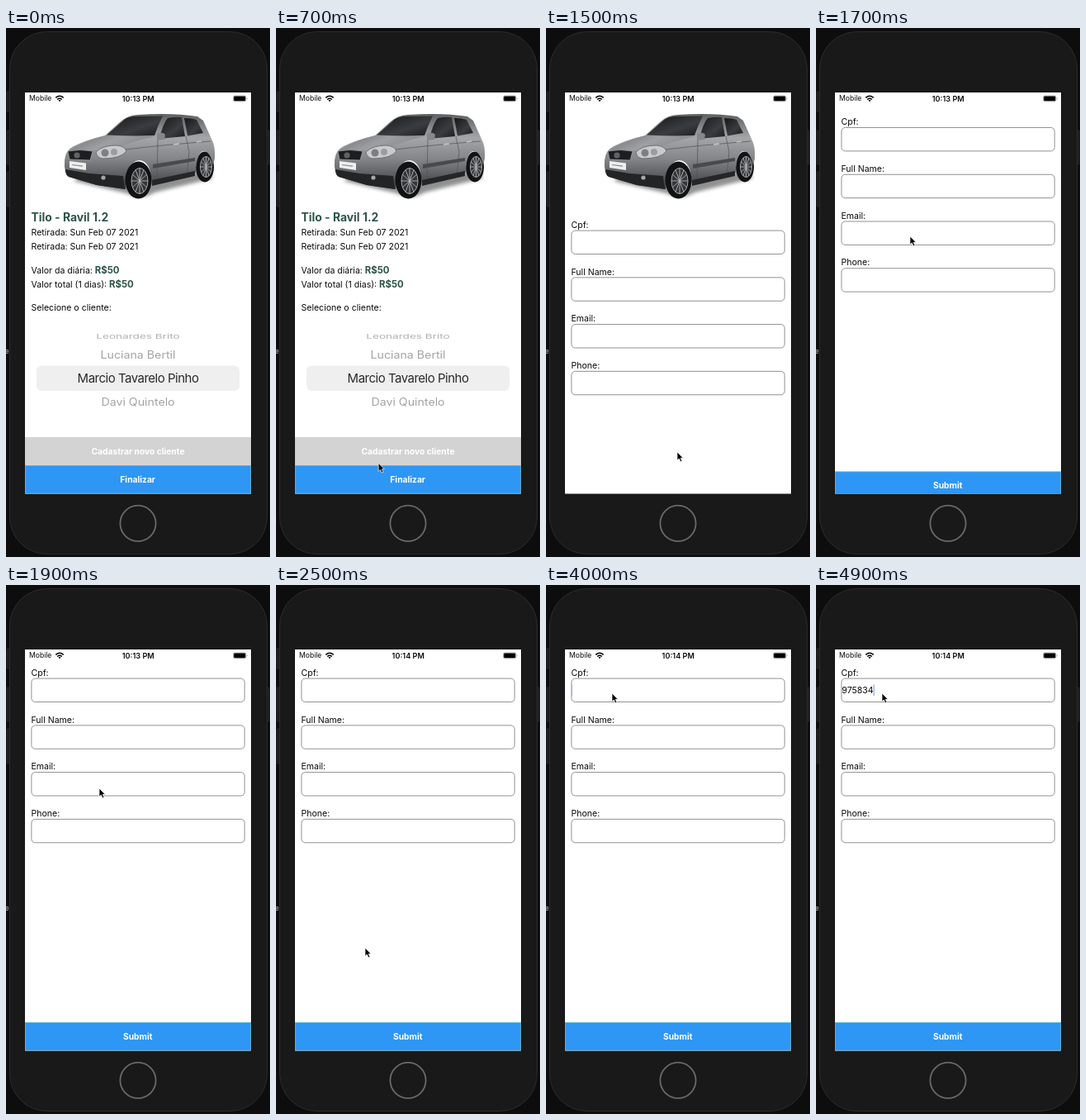
An HTML page that plays this animation: 320x640 px, repeating every 5 s.

```html
<!DOCTYPE html>
<html lang="pt">
<head>
<meta charset="utf-8">
<title>Aluguel</title>
<style>
  html, body { margin: 0; width: 100%; height: 100%; overflow: hidden; background: #0d0d0d; }
  svg { display: block; width: 100%; height: 100%; }
  text { font-family: Inter, Roboto, sans-serif; font-size: 10.55px; fill: #0a0a0a; white-space: pre; }
  .bold { font-weight: 700; }
  .mid { text-anchor: middle; }
  .green { fill: #2e5546; }
  .price { font-size: 11.4px; }
  .action { font-size: 10.25px; fill: #fff; }
  .bar { fill: #2e96f5; stroke: #55b2d6; stroke-width: .9; }
  .row { font-size: 14.2px; fill: #a3a3a3; }
  .status { font-size: 8.6px; }
  .field { fill: #fff; stroke: #858585; stroke-width: .9; }
</style>
</head>
<body>
<svg viewBox="0 0 320 640">
  <defs>
    <clipPath id="screen"><rect x="23" y="78" width="274" height="485.5"/></clipPath>
    <clipPath id="content"><rect x="23" y="92" width="274" height="471.5"/></clipPath>
    <filter id="soft" x="-20%" y="-60%" width="140%" height="220%"><feGaussianBlur stdDeviation="2.2"/></filter>
    <linearGradient id="paint" x1="0" y1="0" x2="0" y2="1">
      <stop offset="0" stop-color="#5d5f61"/><stop offset=".32" stop-color="#a4a6a8"/>
      <stop offset=".6" stop-color="#838588"/><stop offset="1" stop-color="#38393b"/>
    </linearGradient>
    <linearGradient id="hood" x1="0" y1="0" x2="1" y2=".4">
      <stop offset="0" stop-color="#6c6e71"/><stop offset=".55" stop-color="#9d9fa2"/><stop offset="1" stop-color="#85878a"/>
    </linearGradient>
    <linearGradient id="glass" x1="0" y1="0" x2="1" y2="1">
      <stop offset="0" stop-color="#151617"/><stop offset=".6" stop-color="#3a3d40"/><stop offset="1" stop-color="#1a1b1d"/>
    </linearGradient>
  </defs>

  <g id="phone">
    <rect width="320" height="640" fill="#0d0d0d"/>
    <g fill="#1d1d1d" stroke="#303030" stroke-width=".7">
      <rect x="1" y="77" width="6" height="24" rx="1"/>
      <rect x="1" y="124" width="6" height="41" rx="1"/>
      <rect x="1" y="174" width="6" height="42" rx="1"/>
      <rect x="314" y="124" width="5" height="41" rx="1"/>
    </g>
    <rect x="4.5" y="4.5" width="312" height="632" rx="45" fill="#191919" stroke="#2c2c2c"/>
    <circle cx="160" cy="599.3" r="21.6" fill="#191919" stroke="#696969" stroke-width="1.8"/>
    <text x="-1" y="394" style="font-size:8px;fill:#bbb">e</text>
    <rect x="23" y="78" width="274" height="485.5" fill="#fff"/>
  </g>

  <g clip-path="url(#content)">
    <g id="car">
      <path d="M82 185L146 200Q164 209 180 199L250 182L248 174L95 176Z" fill="#222" opacity=".5" filter="url(#soft)"/>
      <ellipse cx="241" cy="168" rx="11" ry="18.5" fill="#111213"/>
      <path d="M71 160Q72 148 82 143Q98 135 120 130L138 114Q147 105.500 160 105Q200 102 232 107L239 112L249 134Q254 143 253 158L251 166Q247 148 239 149Q231 151 230 174L228 179L177 190Q176 160 161 160Q146 162 145 195L110 190L76 180Q70 176 71 160Z" fill="url(#paint)"/>
      <path d="M76 149Q92 137 121 130L181 131Q154 137 141 143L108 148Z" fill="url(#hood)"/>
      <path d="M122 129.500L140 114Q146 107.500 155 107L190 106.500Q184 118 180 130Q153 131 122 129.500Z" fill="url(#glass)"/>
      <path d="M186 134Q190 116 196 109Q206 107 213 108L217 131Z" fill="url(#glass)"/>
      <path d="M216 109Q226 109 231 111L239 127L220 130.500Z" fill="url(#glass)"/>
      <path d="M184 135L183 184M218 131L222 150L219 180M145 147Q185 142 248 137" fill="none" stroke="#505255" stroke-width=".7"/>
      <path d="M178 165L229 157V161L178 170Z" fill="#484a4c"/>
      <path d="M177 184L229 173V179L177 191Z" fill="#252628"/>
      <path d="M183 128Q190 125 193 129L192 135L183 136Z" fill="#85878a"/>
      <path d="M203 141l7-1M231 138l6-1" stroke="#c4c4c4" stroke-width="1.4"/>
      <path d="M75 149Q90 146 105 149L102 160L77 159Z" fill="#1d1e20" stroke="#aaa" stroke-width=".7"/>
      <circle cx="86" cy="154" r="3.600" fill="#606266"/>
      <path d="M109 150Q117 142 134 142Q144 143 146 149Q139 158 117 158Q110 157 109 150Z" fill="#c8cbcd" stroke="#55575a" stroke-width=".7"/>
      <circle cx="120" cy="151" r="4.500" fill="#7b7f83"/>
      <circle cx="131" cy="150" r="4" fill="#999da0"/>
      <path d="M72 171L101 176L142 179L144 195L110 190L76 180Q72 178 72 171Z" fill="#232426"/>
      <path d="M77 161L97 163.500V172L77 169Z" fill="#eee"/>
      <path d="M80 165.500l13 1.600" stroke="#888" stroke-width="1.200"/>
      <circle cx="118" cy="181" r="2.600" fill="#a5a7a9"/>
      <ellipse cx="160.500" cy="184" rx="16" ry="22.500" fill="#111213"/>
      <g id="wheels" stroke="#b4b6b8" fill="#333537" stroke-width=".9"></g>
    </g>
  </g>

  <g id="rental" clip-path="url(#screen)">
    <text class="bold green" x="30.5" y="234" style="font-size:13.9px">Tilo - Ravil 1.2</text>
    <text x="30.5" y="251">Retirada: Sun Feb 07 2021</text>
    <text x="30.5" y="268.200">Retirada: Sun Feb 07 2021</text>
    <text x="30.5" y="296.700">Valor da diária: <tspan class="bold green price">R$50</tspan></text>
    <text x="30.5" y="314.300">Valor total (1 dias): <tspan class="bold green price">R$50</tspan></text>
    <text x="30.5" y="342.300">Selecione o cliente:</text>
    <rect x="37" y="408.500" width="246" height="30.500" rx="6" fill="#efefef"/>
    <text class="row mid" transform="translate(160 376) scale(1 .58)" style="font-size:13.6px;fill:#b0b0b0">Leonardes Brito</text>
    <text class="row mid" transform="translate(160 399.500) scale(1 .9)">Luciana Bertil</text>
    <text class="row mid" x="160" y="429.200" style="font-size:15px;letter-spacing:-.5px;fill:#2a2a2a">Marcio Tavarelo Pinho</text>
    <text class="row mid" transform="translate(160 457) scale(1 .9)">Davi Quintelo</text>
    <g id="register">
      <rect x="23" y="495" width="274" height="34.500" fill="#d3d3d3"/>
      <text class="action bold mid" x="160" y="515.800">Cadastrar novo cliente</text>
    </g>
    <rect class="bar" x="23.500" y="529.500" width="273" height="33.500"/>
    <text class="action bold mid" x="159.700" y="550">Finalizar</text>
  </g>

  <g clip-path="url(#content)">
    <g id="form">
      <g id="fields"></g>
      <text id="typed" x="31.300" y="131"></text>
      <rect id="caret" y="120.500" width="1.300" height="13.500" fill="#4a80d8"/>
      <rect class="bar" x="23.500" y="529.500" width="273" height="33.500"/>
      <text class="action bold mid" x="159.700" y="550">Submit</text>
    </g>
  </g>

  <g id="statusbar">
    <text class="status" x="28" y="88.400">Mobile</text>
    <g fill="none" stroke="#000" stroke-width="1.500">
      <path d="M60.300 84.400Q65 80 69.700 84.400M62.200 86.500Q65 84 67.800 86.500"/>
    </g>
    <path d="M63.400 87.600Q65 86.400 66.600 87.600L65 89.300Z"/>
    <text id="clock" class="status mid" x="160.200" y="88.500" style="font-size:9.1px;font-weight:600"></text>
    <rect x="275.500" y="82" width="15.500" height="6.800" rx="1.800" fill="#fff" stroke="#999" stroke-width=".7"/>
    <rect x="276.200" y="82.600" width="14.100" height="5.600" rx="1.200"/>
    <path d="M292 84.200q1.400 1.200 0 2.400z" fill="#888"/>
  </g>

  <path id="cursor" d="M0 0V10L2.300 8L4 11.700L5.800 10.900L4.200 7.300H7.200Z" fill="#000" stroke="#fff" stroke-width=".7"/>
</svg>
<script>
const LOOP = 5000, STEP = 100, FORM_SHIFT = 132, FORM_AT = 1400;
const $ = id => document.getElementById(id);

// Eased interpolation through [time, value, ...] points.
function track(points, t) {
  const next = points.findIndex(p => p[0] > t);
  if (next === 0) return points[0].slice(1);
  if (next < 0) return points[points.length - 1].slice(1);
  const a = points[next - 1], b = points[next];
  const u = (t - a[0]) / (b[0] - a[0]);
  const k = u * u * (3 - 2 * u);
  return a.slice(1).map((v, i) => v + (b[i + 1] - v) * k);
}

const pointer = [
  [100, 0, 564], [400, 60, 552], [900, 159, 512.5], [1500, 159, 513],
  [1700, 114, 252], [1900, 113, 246], [2500, 108, 439], [3000, 75, 136], [3200, 80, 131]
];
const press = [[1100, 1], [1300, .13]];
const scroll = [[1500, 0], [1700, 124.6], [1900, FORM_SHIFT]];
const blink = [
  [3100, 0], [3200, 1], [3400, 1], [3600, 0], [3900, 0],
  [4000, .25], [4100, 1], [4700, 1], [4900, .65]
];

function wheel(cx, cy, rx, ry) {
  let spokes = "";
  for (let i = 0; i < 12; i++) {
    const a = i * Math.PI / 6;
    spokes += `M${cx} ${cy}L${cx + rx * Math.cos(a)} ${cy + ry * Math.sin(a)}`;
  }
  return `<ellipse cx="${cx}" cy="${cy}" rx="${rx}" ry="${ry}"/><path d="${spokes}"/>`;
}

$("wheels").innerHTML = wheel(162, 185, 10, 15.5) + wheel(242.5, 168, 7, 12.5);
$("fields").innerHTML = ["Cpf:", "Full Name:", "Email:", "Phone:"].map((label, i) => {
  const y = i * 56.75;
  return `<text x="30.500" y="${109.8 + y}">${label}</text>
    <rect class="field" x="30.900" y="${113.1 + y}" width="258.300" height="28.400" rx="4.500"/>`;
}).join("");

const show = (id, on) => $(id).setAttribute("display", on ? "inline" : "none");
const move = (id, x, y) => $(id).setAttribute("transform", `translate(${x} ${y})`);

function draw(t) {
  const onForm = t >= FORM_AT;
  const [offset] = track(scroll, t);
  show("rental", !onForm);
  show("form", onForm);
  $("register").setAttribute("opacity", track(press, t)[0]);
  move("car", 0, -offset);
  move("form", 0, FORM_SHIFT - offset);

  $("clock").textContent = t < 2100 ? "10:13 PM" : "10:14 PM";

  const typedCount = Math.max(0, Math.min(6, (t - 4000) / 50));
  $("typed").textContent = "975834".slice(0, typedCount);
  const width = typedCount ? $("typed").getComputedTextLength() : 0;
  $("caret").setAttribute("x", 31.2 + width);
  $("caret").setAttribute("opacity", track(blink, t)[0]);

  show("cursor", t >= 100);
  move("cursor", ...track(pointer, t));
}

const start = performance.now();
function tick() {
  const t = (performance.now() - start) % LOOP;
  draw(Math.floor(t / STEP) * STEP);
  requestAnimationFrame(tick);
}
draw(0);
requestAnimationFrame(tick);
</script>
</body>
</html>
```
